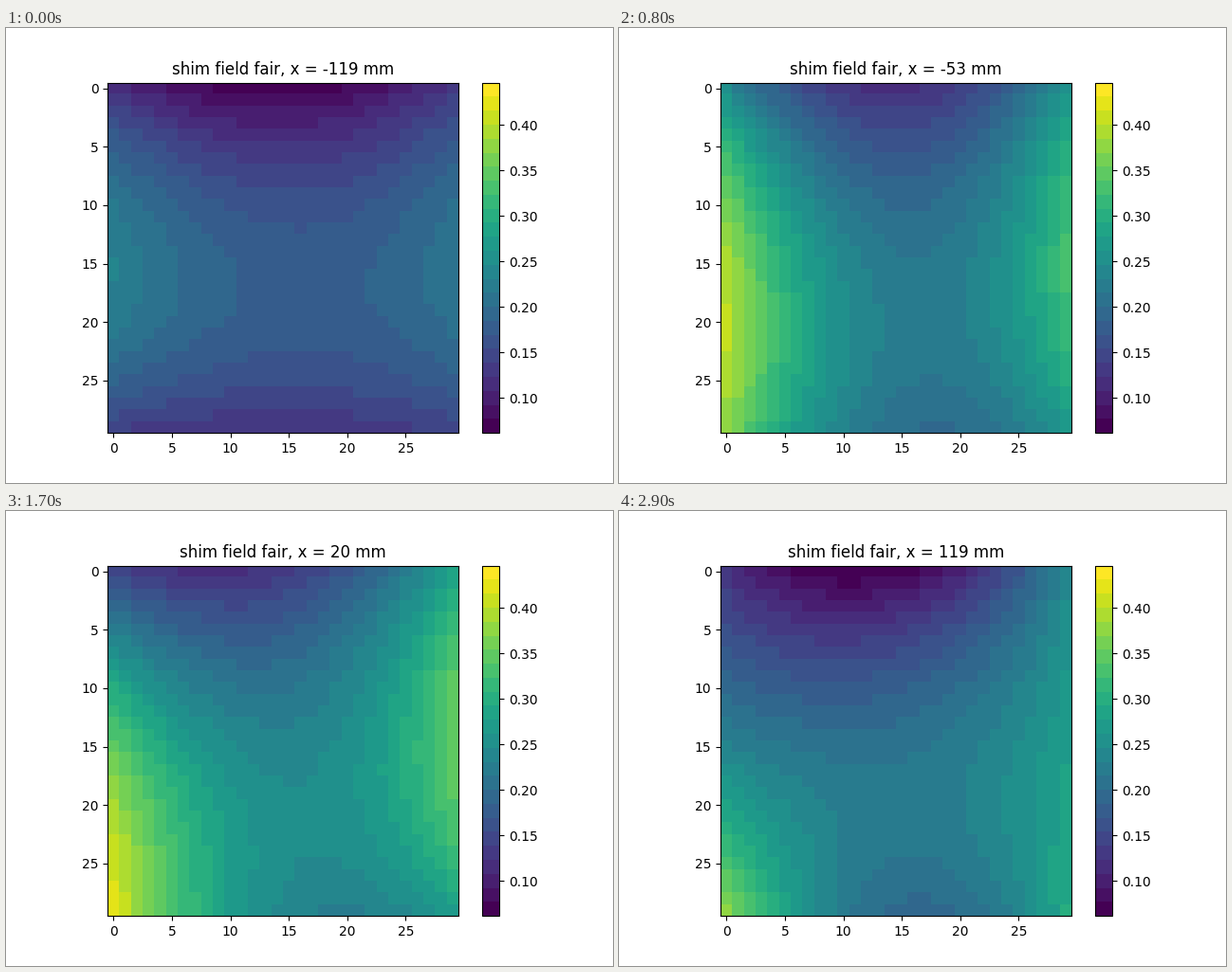
Recreate the animation shown at these times as a matplotlib script. Size 640 by 480 pixels, loop 3 s.

```python
import numpy as np
import matplotlib.pyplot as plt
from matplotlib.animation import FuncAnimation

FRAMES = 30
SIZE = 30
LEVELS = 25
X_MAX = 119.9
V_MIN, V_MAX = 0.0613, 0.4463

# Grid coordinates from -1 to 1
across = np.linspace(-1, 1, SIZE)[None, :]
down = np.linspace(-1, 1, SIZE)[:, None]


def bend(start, middle, end, t):
    """Parabola through three values at t = -1, 0 and 1."""
    return middle + (end - start) / 2 * t + ((start + end) / 2 - middle) * t**2


def wave(s, base, swell, drift=0, sway=0):
    """Strength along the bore: a hump, a linear drift and a full sine."""
    return (base + swell * np.cos(np.pi * s / 2)
            + drift * s + sway * np.sin(np.pi * s))


def position(t):
    return 2 * t / (FRAMES - 1) - 1


def field(t):
    s = position(t)
    left = bend(wave(s, 0.16, 0.17, 0.01, -0.20),
                wave(s, 0.44, 0.37, 0, -0.13),
                wave(s, 0.51, 0.44, 0.30, -0.10), down)
    centre = bend(wave(s, 0.02, 0.17),
                  wave(s, 0.34, 0.11, 0.04),
                  wave(s, 0.26, 0.20, 0.09), down)
    right = bend(wave(s, 0.32, 0.26, 0.14, -0.06),
                 wave(s, 0.47, 0.29, 0.08, -0.03),
                 wave(s, 0.41, 0.16, 0.19, -0.08), down)
    return V_MIN + (V_MAX - V_MIN) * bend(left, centre, right, across)


def title_text(t):
    return f"shim field fair, x = {int(X_MAX * position(t))} mm"


fig, ax = plt.subplots(figsize=(6.4, 4.8), dpi=100)
image = ax.imshow(field(0), cmap=plt.get_cmap("viridis", LEVELS),
                  vmin=V_MIN, vmax=V_MAX)
fig.colorbar(image)
title = ax.set_title(title_text(0))


def update(t):
    image.set_data(field(t))
    title.set_text(title_text(t))
    return image, title


anim = FuncAnimation(fig, update, frames=FRAMES, interval=100,
                     repeat=True, repeat_delay=0, blit=False)
plt.show()
```
